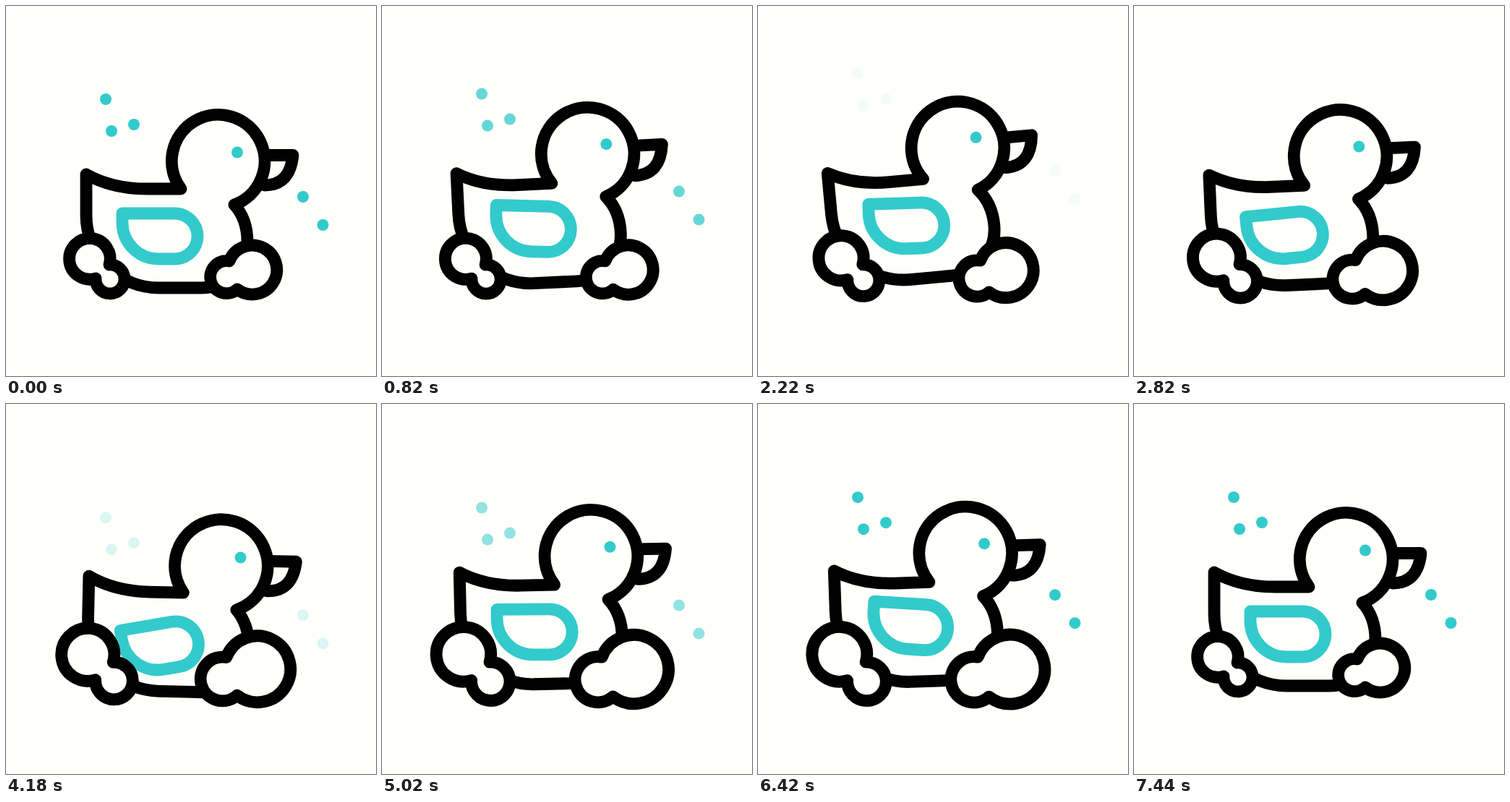
Write an HTML page that moves like this. It is 512 px wide and 512 px high and loops after 7460 ms.

```html
<!DOCTYPE html>
<html lang="en">
<head>
<meta charset="utf-8">
<title>Rubber duck</title>
<style>
  html, body { margin: 0; height: 100%; overflow: hidden; background: #fffffb; }
  svg { display: block; width: 100%; height: 100%; }
  path { fill: none; stroke: #000; stroke-width: 16.8; stroke-linecap: round; stroke-linejoin: round; }
  circle { fill: #33cacb; }
  #wing { stroke: #33cacb; }
  .foam { fill: #fffffb; }
</style>
</head>
<body>
<svg viewBox="0 0 512 512">
  <g id="dots">
    <circle cx="138" cy="129" r="8"/>
    <circle cx="146" cy="173" r="8"/>
    <circle cx="177" cy="164" r="8"/>
    <circle cx="411" cy="264" r="8"/>
    <circle cx="438.5" cy="303" r="8"/>
  </g>
  <g id="duck">
    <path d="M111 233Q147 253 195 253H242A64.3 64.3 0 1 1 316 275Q334 295 334 326A64 64 0 0 1 270 390H211A100 100 0 0 1 111 290Z"/>
    <path d="M358 206.5H397Q393 248 358 248"/>
    <circle cx="320" cy="202.5" r="8"/>
    <path id="wing" d="M161 287H233.5A31.5 31.5 0 0 1 233.5 350H211A50 50 0 0 1 161 300Z"/>
  </g>
  <path class="foam" id="foamLeft" d="M143 358A28.3 28.3 0 1 0 124 377A20 20 0 1 0 143 358Z"/>
  <path class="foam" id="foamRight" d="M320 392A34 34 0 1 0 309 353A22.5 22.5 0 1 0 320 392Z"/>
</svg>
<script>
const LOOP = 7460, STEPS = 160, DRIFT = 40;
const [dots, duck, wing, foamLeft, foamRight] =
  ['dots', 'duck', 'wing', 'foamLeft', 'foamRight'].map(id => document.getElementById(id));

// Goes smoothly from 0 to 1 between two steps.
function ease(step, from, to) {
  const x = Math.min(1, Math.max(0, (step - from) / (to - from)));
  return (1 - Math.cos(Math.PI * x)) / 2;
}

// Rocks from rest through three turning points and back to rest.
function swing(step, firstTurn, a, b, c) {
  return a * ease(step, 0, firstTurn)
    + (b - a) * ease(step, firstTurn, 87)
    + (c - b) * ease(step, 87, 122)
    - c * ease(step, 122, STEPS);
}

// Steps last 20, 20 and 100 ms in turn.
function stepAt(time) {
  const t = time + 20;
  return 3 * Math.floor(t / 140) + Math.min(2, Math.floor(t % 140 / 20)) - 1;
}

function inflate(foam, scale, x, y) {
  foam.setAttribute('transform', `translate(${x} ${y}) scale(${scale}) translate(${-x} ${-y})`);
  foam.style.strokeWidth = 16.8 / scale;
}

function draw() {
  const step = stepAt(performance.now() % LOOP);

  const bob = swing(step, 36, -18.6, 8.6, -10.8);
  const tilt = swing(step, 36, -6.1, 1.35, -3);
  const flap = swing(step, 30, 7.1, -11.2, 8.6);
  duck.setAttribute('transform', `translate(0 ${bob}) rotate(${tilt} 256 400)`);
  wing.setAttribute('transform', `rotate(${flap} 264 323)`);

  // Dots leave upwards, then a new set rises from below.
  const rise = step < 60 ? -DRIFT * ease(step, 0, 60) : DRIFT * (1 - ease(step, 60, 140));
  dots.setAttribute('transform', `translate(0 ${rise})`);
  dots.setAttribute('opacity', (1 - Math.abs(rise) / DRIFT) ** 1.4);

  const growth = ease(step, 8, 116) - ease(step, 137, STEPS);
  inflate(foamLeft, 1 + 0.34 * growth, 125, 360.5);
  inflate(foamRight, 1 + 0.41 * growth, 320.8, 360);
  requestAnimationFrame(draw);
}
draw();
</script>
</body>
</html>
```
